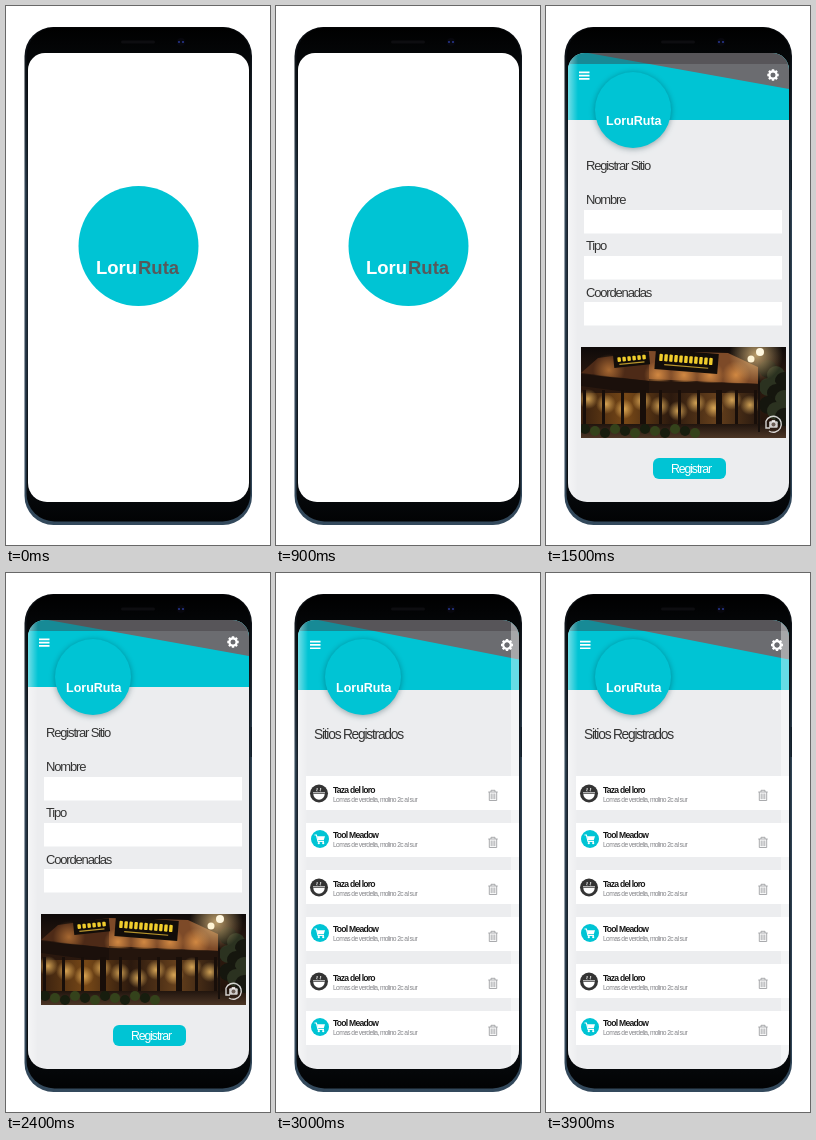
Recreate the animation shown at these times as an HTML page with a canvas. Size 264 px wide and 539 px high, loop 4.5 s.

```html
<!DOCTYPE html>
<html lang="es">
<head>
<meta charset="utf-8">
<title>App de sitios</title>
<style>
html, body { margin: 0; width: 100%; height: 100%; overflow: hidden; background: #fff; }
canvas { display: block; }
</style>
</head>
<body>
<canvas id="stage" width="264" height="539"></canvas>
<script>
const ctx = document.getElementById('stage').getContext('2d');
const CYAN = '#00c4d4', PAGE = '#ecedef', DARK = '#343434';
const SCREEN = { x: 22, y: 47, w: 221, h: 449 };
const SCENE_MS = 1500;

function rect(x, y, w, h, color, radius = 0) {
  ctx.fillStyle = color;
  ctx.beginPath();
  ctx.roundRect(x, y, w, h, radius);
  ctx.fill();
}

function disc(x, y, r, color) {
  ctx.fillStyle = color;
  ctx.beginPath();
  ctx.arc(x, y, r, 0, Math.PI * 2);
  ctx.fill();
}

function poly(points, color) {
  ctx.fillStyle = color;
  ctx.beginPath();
  points.forEach(([x, y]) => ctx.lineTo(x, y));
  ctx.fill();
}

function line(path, color, width) {
  ctx.strokeStyle = color;
  ctx.lineWidth = width;
  ctx.stroke(new Path2D(path));
}

function at(x, y, draw) {
  ctx.save();
  ctx.translate(x, y);
  draw();
  ctx.restore();
}

function glow(x, y, r, rgb, alpha) {
  const g = ctx.createRadialGradient(x, y, 0, x, y, r);
  g.addColorStop(0, `rgba(${rgb},${alpha})`);
  g.addColorStop(1, `rgba(${rgb},0)`);
  ctx.fillStyle = g;
  ctx.fillRect(x - r, y - r, r * 2, r * 2);
}

function fade(x0, y0, x1, y1, ...colors) {
  const g = ctx.createLinearGradient(x0, y0, x1, y1);
  colors.forEach((c, i) => g.addColorStop(i / (colors.length - 1), c));
  return g;
}

function text(str, x, y, size, color, weight = 400, tracking = -0.09) {
  ctx.font = `${weight} ${size}px "Liberation Sans", Arial, sans-serif`;
  ctx.letterSpacing = `${size * tracking}px`;
  ctx.fillStyle = color;
  ctx.fillText(str, x, y);
}

function phone() {
  rect(18.5, 21, 227.5, 498, fade(0, 21, 0, 519, '#07090c', '#2f4354', '#2b3d4e', '#33495c'), 29);
  rect(20.5, 21.5, 224, 494, fade(0, 21, 0, 516, '#000', '#18222c', '#1a2530', '#020304'), 28);
  rect(244.5, 154, 1.5, 30, '#14202b');
  rect(115, 34.5, 34, 3, '#0d0d10', 1.5);
  disc(175, 36, 4, '#07070d');
  disc(173, 36, 1.1, '#26348a');
  disc(177, 36, 1.1, '#26348a');
}

function badge(x, y, r, shadow) {
  ctx.save();
  if (shadow) {
    ctx.shadowColor = 'rgba(0,40,50,.4)';
    ctx.shadowBlur = 6;
    ctx.shadowOffsetY = 1;
  }
  disc(x, y, r, CYAN);
  ctx.restore();
}

function gear(x, y, r) {
  at(x, y, () => {
    for (let i = 0; i < 8; i++) {
      ctx.rotate(Math.PI / 4);
      rect(-1.2, -r, 2.4, 3, '#fff');
    }
    ctx.strokeStyle = '#fff';
    ctx.lineWidth = r * 0.36;
    ctx.beginPath();
    ctx.arc(0, 0, r * 0.64, 0, Math.PI * 2);
    ctx.stroke();
  });
}

function header(bottom, slopeY, menuX, menuY, gearX, gearY, gearR) {
  const { x, y, w, h } = SCREEN;
  rect(x, y, w, h, PAGE);
  rect(x, y, w, bottom - y, CYAN);
  poly([[42, y], [x + w, y], [x + w, slopeY]], '#6b6c70');
  rect(x, y, w, 11, 'rgba(58,52,56,.4)');
  for (let i = 0; i < 3; i++) rect(menuX, menuY + i * 3.3, 10.5, 1.7, '#fff');
  gear(gearX, gearY, gearR);
  badge(87, 104, 38, true);
  text('LoruRuta', 60, 119, 12.5, '#fff', 700, 0);
}

// Soft reflections along the curved glass edges
function glare(rightAlpha) {
  const { x, y, w, h } = SCREEN;
  rect(x, y, 10, h, fade(x, 0, x + 10, 0, 'rgba(255,255,255,.45)', 'rgba(255,255,255,0)'));
  rect(x + w - 8, y, 8, h, `rgba(255,255,255,${rightAlpha})`);
}

function bowlIcon() {
  disc(0, 0, 9, DARK);
  ctx.fillStyle = '#fff';
  ctx.beginPath();
  ctx.arc(0, 0.5, 5.7, 0, Math.PI);
  ctx.fill();
  line('M-6 -.7H6M-2 -2.2C-3 -3.5 -1 -4 -2 -5.5M1.5 -2.2C.5 -3.5 2.5 -4 1.5 -5.5', '#fff', 0.9);
}

function cartIcon() {
  disc(0, 0, 9, CYAN);
  line('M-5.5 -4H-3.6L-2 2.4H4', '#fff', 1.1);
  poly([[-3, -2.8], [5, -2.8], [3.8, 1.1], [-2, 1.1]], '#fff');
  disc(-1.2, 4.2, 1.1, '#fff');
  disc(3.2, 4.2, 1.1, '#fff');
}

function trashIcon() {
  line('M-4.7 -3.5H4.7M-2 -3.5V-5.2H2V-3.5M-3.7 -3.5V5H3.7V-3.5M-1.8 -2V3.7M0 -2V3.7M1.8 -2V3.7', '#a0a1a4', 0.9);
}

// A lit, unlettered sign: one bright band of small lights
function sign(x, y, w, h, tilt) {
  at(x, y, () => {
    ctx.rotate(tilt);
    rect(0, 0, w, h, '#120d09');
    for (let i = 4; i < w - 5; i += 5) rect(i, h * 0.22, 3.4, h * 0.36, '#f0cd2c', 1);
    rect(w * 0.15, h * 0.72, w * 0.7, 1.2, '#b8952c');
  });
}

function photo() {
  ctx.save();
  ctx.beginPath();
  ctx.rect(35, 341, 205, 91);
  ctx.clip();
  rect(35, 341, 205, 91, fade(0, 341, 0, 432, '#0e0a09', '#2a180f', '#2a170c', '#1a100c'));
  poly([[52, 352], [103, 345], [103, 375], [35, 367]], '#4d2a17');
  poly([[103, 345], [182, 347], [214, 362], [214, 378], [103, 373]], '#7d4a28');
  for (let i = 0; i < 4; i++) glow(112 + i * 26, 369, 14, '255,170,80', 0.65);
  glow(63, 364, 16, '255,165,75', 0.5);
  poly([[35, 368], [103, 375], [103, 389], [35, 380]], '#1b100b');
  poly([[103, 375], [216, 378], [216, 388], [103, 389]], '#24150d');
  rect(35, 387, 180, 32, fade(35, 0, 215, 0, '#38200f', '#774817', '#2b190e', '#66401c', '#25170f'));
  for (let i = 0; i < 10; i++) glow(42 + i * 18, 393 + i * 5 % 13, 10, '255,200,105', 0.75);
  for (let i = 0; i < 10; i++) rect(37 + i * 19, 384, i % 4 === 3 ? 6 : 3, 38, '#180e09');
  sign(110, 343, 63, 20, 0.08);
  sign(67, 349, 36, 13, -0.1);
  rect(35, 418, 205, 14, fade(0, 418, 0, 432, '#21150e', '#4b3525'));
  for (let i = 0; i < 12; i++) disc(39 + i * 10, 423 + i % 3 * 2, 5, i % 2 ? '#34421b' : '#171d0e');
  for (let i = 0; i < 9; i++) disc(222 + i % 3 * 8, 363 + i * 6, 9, i % 2 ? '#2b3220' : '#15160e');
  rect(212, 351, 2, 75, '#17100c');
  glow(210, 349, 27, '255,215,145', 0.7);
  disc(205, 353, 3.5, '#fff4d4');
  disc(214, 346, 4, '#fff7df');
  ctx.restore();

  at(227, 418, () => {
    ctx.globalAlpha = 0.8;
    line('M-7 -3A8 8 0 1 1 -4 7M-7 -3V4H-3', '#fff', 1.4);
    rect(-3.8, -2.8, 8.5, 6.5, '#fff', 1);
    rect(-1.3, -4, 3.5, 2, '#fff');
    disc(0.5, 0.5, 2, '#514036');
  });
}

function splash() {
  rect(SCREEN.x, SCREEN.y, SCREEN.w, SCREEN.h, '#fff');
  badge(132.5, 240, 60, false);
  text('Loru', 90, 268, 18.5, '#fff', 700, 0);
  text('Ruta', 132, 268, 18.5, '#58595b', 700, 0);
}

function form() {
  header(114, 83, 33, 65.5, 227, 69, 5.7);
  glare(0);
  text('Registrar Sitio', 40, 164, 13, DARK);
  ['Nombre', 'Tipo', 'Coordenadas'].forEach((label, i) => {
    text(label, 40, 198 + i * 46.4, 13, DARK);
    rect(38, 204 + i * 46, 198, 23.5, '#fff');
  });
  photo();
  rect(107, 452, 73, 21, CYAN, 6);
  text('Registrar', 125, 467, 12.3, '#fff');
}

function list() {
  header(117, 86.5, 34, 67.8, 231, 72, 6);
  text('Sitios Registrados', 38, 165.5, 13.8, DARK);
  for (let i = 0; i < 6; i++) {
    const y = Math.round(203 + i * 46.9), cafe = i % 2 === 0;
    const nameY = y + (cafe ? 16.5 : 14.5);
    rect(30, y, 213, 34, '#fff');
    at(cafe ? 43 : 44, y + (cafe ? 17.5 : 16), cafe ? bowlIcon : cartIcon);
    text(cafe ? 'Taza del loro' : 'Tool Meadow', 57, nameY, 8.6, '#171717', 700);
    text('Lomas de verdelia, molino 2c al sur', 57, nameY + 9.2, 6.7, '#85868a');
    at(217, y + 19.5, trashIcon);
  }
  glare(0.4);
}

const scenes = [splash, form, list];

function render(scene) {
  ctx.fillStyle = '#fff';
  ctx.fillRect(0, 0, 264, 539);
  phone();
  ctx.save();
  ctx.beginPath();
  ctx.roundRect(SCREEN.x, SCREEN.y, SCREEN.w, SCREEN.h, [17, 17, 19, 19]);
  ctx.clip();
  scenes[scene]();
  ctx.restore();
}

const start = performance.now();
function tick() {
  const elapsed = performance.now() - start;
  render(Math.floor(elapsed / SCENE_MS) % scenes.length);
  requestAnimationFrame(tick);
}
tick();
</script>
</body>
</html>
```
